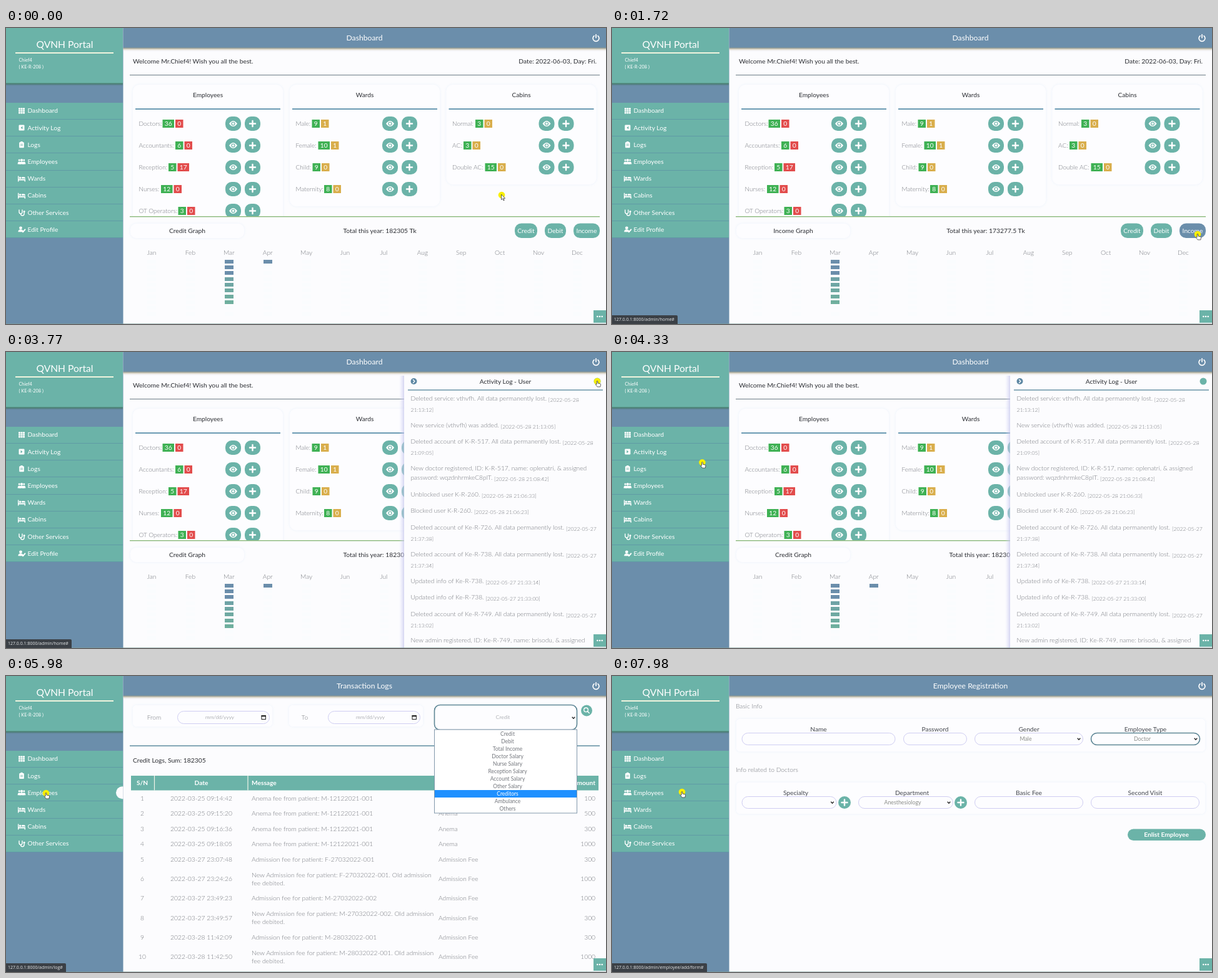
An HTML page that plays this animation: 960x475 px, repeating every 8000 ms.

```html
<!DOCTYPE html>
<html lang="en">
<head>
<meta charset="utf-8">
<title>Portal tour</title>
<style>
html, body { margin: 0; width: 100%; height: 100%; overflow: hidden; background: #fcfcfe; }
svg { display: block; width: 960px; height: 475px; }
text { font-family: Lato, "Open Sans", sans-serif; white-space: pre; }
.status { font-family: "Open Sans", "Noto Sans", sans-serif; }
.card { fill: #fdfdff; stroke: #f6f8fd; filter: drop-shadow(0 0 1.5px rgba(130, 190, 240, .1)); }
.field { fill: #fdfdff; stroke: #cfcdf2; }
.focus { fill: none; stroke: #5e8795; stroke-width: 1.6; }
.line { fill: none; stroke: #fff; stroke-width: 1.4; stroke-linecap: round; stroke-linejoin: round; }
</style>
</head>
<body>
<svg id="stage" viewBox="0 0 960 475"></svg>
<script>
const LOOP = 8000;
const TEAL = '#6bb3a8', BLUE = '#6b8eab', INK = '#2c2e33', GREY = '#74777d';
const GREEN = '#3fb154', RED = '#e24c4c', AMBER = '#d9ae4c';
const BOLD = 'font-weight="700"', LIGHT = 'font-weight="300"';

// y is the optical middle of a line of text; grey text is set light
const text = (x, y, s, size = 10, fill = INK, anchor = 'start', more = fill === GREY ? LIGHT : '') =>
  `<text x="${x}" y="${(y + size * .35).toFixed(2)}" font-size="${size}" fill="${fill}" text-anchor="${anchor}" ${more}>${s}</text>`;
const mid = (x, y, s, size, fill, more) => text(x, y, s, size, fill, 'middle', more);
const rect = (x, y, w, h, fill, r = 0, more = '') =>
  `<rect x="${x}" y="${y}" width="${w}" height="${h}" rx="${r}" fill="${fill}" ${more}/>`;
const box = (x, y, x2, y2, r, cls) =>
  `<rect class="${cls}" x="${x + .5}" y="${y + .5}" width="${x2 - x - 1}" height="${y2 - y - 1}" rx="${r}"/>`;
const dot = (x, y, r, fill) => `<circle cx="${x}" cy="${y}" r="${r}" fill="${fill}"/>`;
const path = (d, fill = '#fff', more = '') => `<path d="${d}" fill="${fill}" ${more}/>`;
const stroke = (d, more = '') => `<path class="line" d="${d}" ${more}/>`;
const at = (x, y, s) => `<g transform="translate(${x} ${y})">${s}</g>`;
const group = (id, s) => `<g id="${id}">${s}</g>`;
const range = n => [...Array(n).keys()];

// icons, centred on 0,0
const plus = stroke('M-4.5 0H4.5M0 -4.5V4.5', 'style="stroke-width:2.4"');
const eye = path('M-6.5 0Q0 -9 6.5 0Q0 9 -6.5 0Z') + dot(0, 0, 3.1, TEAL) + dot(0, 0, 1.9, '#fff');
const chevron = (x, y) => `<path d="M${x - 2.3} ${y - 1.2}l2.3 2.4l2.3 -2.4" fill="none" stroke="#222" stroke-width="1.3"/>`;
const bed = path('M-6 -4h1.4v5h10.6v4h-1.4v-2h-9.2v2h-1.4z M0 -2.6h4q2 0 2 2.6h-6z') + dot(-2.4, -1.2, 1.6, '#fff');
const person = (x, r) => dot(x, -2.4, r, '#fff') + path(`M${x - r * 1.7} 4q0 -4 ${r * 1.7} -4t${r * 1.7} 4z`);
const arrowBox = d => rect(-4.5, -4.5, 9, 9, '#fff', 1.3) + path(d, TEAL);
const icons = {
  Dashboard: range(9).map(i => rect(-5 + i % 3 * 3.5, -4.5 + (i / 3 | 0) * 3.2, 3, 2.7, '#fff', .4)).join(''),
  'Activity Log': `<g id="logClosed">${arrowBox('M1.5 -2.5v5l-3 -2.5z')}</g><g id="logOpen">${arrowBox('M-1.5 -2.5v5l3 -2.5z')}</g>`,
  Logs: rect(-3.8, -4, 7.6, 9, '#fff', 1) + rect(-1.8, -5.2, 3.6, 2.4, '#fff', 1) +
    path('M-2 -1h4v.8h-4zM-2 1h4v.8h-4z', TEAL),
  Employees: person(-3.8, 1.5) + person(3.8, 1.5) + person(0, 2.1),
  Wards: bed, Cabins: bed,
  'Other Services': stroke('M-4 -4v3q0 3 2.5 3t2.5 -3v-3M-1.5 2q0 3 2.8 3t2.8 -3v-2') + dot(4.1, -1.6, 1.5, '#fff'),
  'Edit Profile': person(-1.5, 2.4) + stroke('M2 4l3.5 -3.8', 'style="stroke-width:2"')
};

const PITCH = 27.2;
const menu = names => rect(0, 120, 187, Math.round(names.length * PITCH) - 1, TEAL) + names.map((name, i) => {
  const y = 132.8 + i * PITCH;
  return at(25, y, icons[name]) + text(34.5, y, name, 10.2, '#fff') +
    rect(0, Math.round(146 + i * PITCH), 187, 1, '#5f9aa5');
}).join('');
const allItems = Object.keys(icons);

const frame = () =>
  rect(0, 0, 187.5, 475, BLUE) + rect(187.5, 0, 772.5, 31, BLUE) + rect(187.5, 31, 772.5, 7, 'url(#edge)') +
  rect(0, 0, 187, 89, TEAL) + rect(0, 88, 187, 5, 'url(#sideEdge)') +
  mid(94, 27, 'QVNH Portal', 15.6, '#fff') + rect(15, 39, 157, 2, '#f1f5df') +
  text(20.5, 51, 'Chief4', 7.3, '#fff') + text(20.5, 62, '( KE-R-208 )', 7.3, '#fff') +
  stroke('M941 12.6a4.9 4.9 0 1 0 6 0M944 10.5v5', 'style="stroke-width:1.7"');

// dashboard
const card = (x, bottom, title, rows, second) =>
  box(x, 90, x + 242, bottom, 11, 'card') + mid(x + 121, 107.5, title, 10.2) +
  rect(x + 5, 129, 232, 2, '#6a9ab3') + rows.map(([label, a, ax, b, bx], i) => {
    const y = 153 + i * 35;
    const badge = (left, n, fill) => {
      const w = String(n).length * 6 + 6.5;
      return rect(left, y - 6, w, 13, fill) + mid(left + w / 2, y + .3, n, 10.2, '#fff');
    };
    const button = (dx, icon) => rect(x + dx, y - 11, 25, 23, TEAL, 10) + at(x + dx + 12.5, y + .5, icon);
    return text(x + 10.5, y, label + ':', 10, GREY) + badge(ax, a, GREEN) + badge(bx, b, second) +
      button(149, eye) + button(180, plus);
  }).join('');

const monthX = i => 233 + i * 61.9;
const cell = (month, i, fill) => rect(Math.round(monthX(month) - 6.8), Math.round(371.5 + i * 9.35), 14, 6, fill);
const bar = (month, i) => cell(month, i, i < 3 ? BLUE : `rgb(111 ${154 + i * 3} ${172 - i * 2})`);
const buttons = [['Credit', 814, 850], ['Debit', 862, 896], ['Income', 908, 950]];

const dashboard = () =>
  text(203, 53, 'Welcome Mr.Chief4! Wish you all the best.', 10.3) +
  text(945, 53, 'Date: 2022-06-03, Day: Fri.', 10.3, INK, 'end') +
  rect(198, 75, 752, 1, '#6b7b84') +
  `<g clip-path="url(#cards)">` +
  card(202, 330, 'Employees', [['Doctors', 36, 250.5, 0, 271], ['Accountants', 6, 271, 0, 285.5],
    ['Reception', 5, 260, 17, 274.5], ['Nurses', 12, 248, 0, 268.5], ['OT Operators', 3, 275.5, 0, 290]], RED) +
  card(453, 287, 'Wards', [['Male', 9, 489.5, 1, 504], ['Female', 10, 499.5, 1, 520],
    ['Child', 9, 490.5, 0, 505], ['Maternity', 8, 509, 0, 523.5]], AMBER) +
  card(703.5, 252, 'Cabins', [['Normal', 3, 751, 0, 765.5], ['AC', 3, 732, 0, 746.5], ['Double AC', 15, 766.5, 0, 787]], AMBER) +
  '</g>' + rect(198, 302, 752, 1.4, '#8ab97a') +
  box(198, 313, 382, 338, 10, 'card') +
  mid(290, 325, '', 10.3, INK, 'id="graphName"') + mid(598, 325, '', 10.3, INK, 'id="total"') +
  buttons.map(([name, x, x2]) => rect(x, 313.5, x2 - x, 23.5, TEAL, 10.5, `id="btn${name}"`) +
    mid((x + x2) / 2, 325, name, 10.2, '#fff')).join('') +
  range(12).map(m => range(10).map(i => cell(m, i, '#fafcfe')).join('') +
    mid(monthX(m), 360.5, 'Jan Feb Mar Apr May Jun Jul Aug Sep Oct Nov Dec'.split(' ')[m], 10.2, GREY)).join('') +
  range(8).map(i => bar(2, i)).join('') + group('aprilBar', bar(3, 0));

// activity panel: y, text, stamp, optional wrapped end of the stamp
const entries = [
  [74, 'Deleted service: vthvfh. All data permanently lost.', '[2022-05-28', '21:13:12]'],
  [117, 'New service (vthvfh) was added.', '[2022-05-28 21:13:05]'],
  [143, 'Deleted account of K-R-517. All data permanently lost.', '[2022-05-28', '21:09:05]'],
  [186, 'New doctor registered, ID: K-R-517, name: oplenatri, &amp; assigned', ''],
  [201, 'password: wqzdnhrmkeC8plT.', '[2022-05-28 21:08:42]'],
  [228, 'Unblocked user K-R-260.', '[2022-05-28 21:06:33]'],
  [254, 'Blocked user K-R-260.', '[2022-05-28 21:06:23]'],
  [281, 'Deleted account of Ke-R-726. All data permanently lost.', '[2022-05-27', '21:37:38]'],
  [324, 'Deleted account of Ke-R-738. All data permanently lost.', '[2022-05-27', '21:37:34]'],
  [367, 'Updated info of Ke-R-738.', '[2022-05-27 21:33:14]'],
  [393, 'Updated info of Ke-R-738.', '[2022-05-27 21:33:00]'],
  [420, 'Deleted account of Ke-R-749. All data permanently lost.', '[2022-05-27', '21:13:02]'],
  [462, 'New admin registered, ID: Ke-R-749, name: brisodu, &amp; assigned', '']
];
const panel = () =>
  rect(629, 38, 8, 437, 'url(#panelEdge)') + rect(637, 32, 323, 443, '#fcfcfe') +
  dot(652.5, 47, 5, '#5d87a3') + stroke('M651.5 44.5l2.4 2.5l-2.4 2.5') +
  mid(799, 47, 'Activity Log - User', 10.2) + dot(946, 47, 5.5, TEAL) + rect(643, 60.3, 312, 1.4, '#5d8ca0') +
  entries.map(([y, s, stamp, rest]) =>
    text(647.5, y, `${s} <tspan font-size="8.6" dy="2.5">${stamp}</tspan>`, 10.2, GREY) +
    (rest ? text(647.5, y + 19, rest, 8.6, GREY) : '')).join('');

// transaction logs
const anema = 'Anema fee from patient: M-12122021-001';
const debited = id => [`New Admission fee for patient: ${id}. Old admission`, 'fee debited.'];
const first = id => [`Admission fee for patient: ${id}`];
const rows = [
  [196, '25 09:14:42', [anema], 100], [220.5, '25 09:15:20', [anema], 500],
  [245, '25 09:16:36', [anema], 300], [269.5, '25 09:18:05', [anema], 1000],
  [294, '27 23:07:48', first('F-27032022-001'), 300], [325.5, '27 23:24:26', debited('F-27032022-001'), 1000],
  [356.5, '27 23:49:23', first('M-27032022-002'), 1000], [388, '27 23:49:57', debited('M-27032022-002'), 300],
  [419, '28 11:42:09', first('M-28032022-001'), 300], [450.5, '28 11:42:50', debited('M-28032022-001'), 1000]
];
const dateField = (label, labelX, x, x2) =>
  mid(labelX, 66, label, 10.2, GREY) + box(x, 56, x2, 77, 10, 'field') + mid((x + x2) / 2 - 6, 66.5, 'mm/dd/yyyy', 8.3, GREY) +
  `<rect x="${x2 - 13}" y="63.5" width="6.4" height="6" fill="none" stroke="#222"/>` + rect(x2 - 13.4, 63, 7.2, 2.2, '#222');
const options = (id, x, x2, y, names, cx) => group(id, rect(x + .5, y, x2 - x - 1, names.length * 12 + 2, '#fff', 0, 'stroke="#8298ab"') +
  rect(x + 1, y + 1, x2 - x - 2, 12, '#1e90ff', 0, `id="${id}Mark"`) +
  names.map((n, i) => mid(cx, y + 7 + i * 12, n, 8.5, GREY, 'class="option"')).join(''));

const logs = () =>
  box(202, 46, 427, 82, 6, 'card') + box(452, 46, 668, 82, 6, 'card') +
  dateField('From', 237, 274, 422) + dateField('To', 478, 515, 663) +
  box(685, 46, 914, 87, 9, 'field') + mid(795, 66, 'Credit', 8.5, GREY) + chevron(908, 67) +
  dot(929, 55.5, 9, TEAL) + `<circle class="line" cx="928" cy="54.3" r="3.3"/>` + stroke('M930.6 57l2.6 2.6') +
  rect(198, 111.3, 752, 1.5, '#5d8ca0') + text(203, 135, 'Credit Logs, Sum: 182305', 10.3) +
  rect(200, 160, 748, 23.5, TEAL) + [237.5, 387, 686, 835.5].map(x => rect(x - .6, 160, 1.2, 23.5, '#f1f5ea')).join('') +
  mid(218, 171.5, 'S/N', 10.2, '#fff', BOLD) + mid(312.5, 171.5, 'Date', 10.2, '#fff', BOLD) +
  text(393, 171.5, 'Message', 10.2, '#fff', 'start', BOLD) + text(692, 171.5, 'Type', 10.2, '#fff', 'start', BOLD) +
  text(943, 171.5, 'Amount', 10.2, '#fff', 'end', BOLD) +
  rows.map(([y, date, lines, amount], i) =>
    mid(218, y, i + 1, 10.2, GREY) + mid(312.5, y, '2022-03-' + date, 10.3, GREY) +
    lines.map((s, k) => text(393, y + (lines.length > 1 ? k * 13 - 6.5 : 0), s, 10.35, GREY)).join('') +
    text(692, y, i < 4 ? 'Anema' : 'Admission Fee', 10.2, GREY) + text(943, y, amount, 10.2, GREY, 'end')).join('') +
  group('creditFocus', box(685, 46, 914, 87, 9, 'focus')) +
  options('creditList', 685, 914, 86, ['Credit', 'Debit', 'Total Income', 'Doctor Salary', 'Nurse Salary', 'Reception Salary',
    'Account Salary', 'Other Salary', 'Creditors', 'Ambulance', 'Others'], 802.5);

// employee form
const field = (label, x, x2, y, value) =>
  mid((x + x2) / 2, y - 16, label, 10.2, '#45484f') + box(x, y - 10, x2, y + 10, 9.5, 'field') +
  (value === undefined ? '' : mid((x + x2) / 2 - 5, y, value, 8.8, '#8b8d88') + chevron(x2 - 7, y));
const addButton = x => dot(x, 203, 10, TEAL) + at(x, 203, plus);
const form = () =>
  text(198, 48.5, 'Basic Info', 10.2, GREY) + box(198, 68, 950, 122, 6, 'card') +
  field('Name', 207.5, 453.5, 101) + field('Password', 466, 568, 101) +
  field('Gender', 580, 754, 101, 'Male') + field('Employee Type', 766, 941, 101, 'Doctor') +
  text(198, 150.5, 'Info related to Doctors', 10.2, GREY) + box(198, 170, 950, 222, 6, 'card') +
  mid(294, 187, 'Specialty', 10.2, '#45484f') + field('', 207.5, 359.5, 203, '') +
  mid(480, 187, 'Department', 10.2, '#45484f') + field('', 394, 546, 203, 'Anesthesiology') +
  field('Basic Fee', 580, 754, 203) + field('Second Visit', 766, 940, 203) +
  addButton(372) + addButton(558) + rect(825, 245.5, 125, 18.5, TEAL, 9.2) + mid(887, 254.8, 'Enlist Employee', 10.2, '#fff', BOLD) +
  group('typeFocus', box(766, 91, 941, 111, 9.5, 'focus')) +
  options('typeList', 766, 941, 111, ['Doctor', 'Nurse', 'Receptionist', 'Accountant', 'OT Operator', 'Other'], 853);

const pointer = () => dot(0, 0, 5.3, '#f8ef00') +
  group('arrow', path('M-.5 -1v8.6l2 -1.8l1.5 3.2l1.3 -.6l-1.4 -3.1h2.7z', '#fff', 'stroke="#222" stroke-width=".7"')) +
  group('hand', path('M-.9 0q.9 -1.2 1.8 0v3l3.8 .9q1 .3 .8 1.6l-.7 3.4h-4.6l-2.9 -3.6q.4 -1.3 1.8 -.2z', '#fff', 'stroke="#222" stroke-width=".7"'));

const fade = (id, dir, ...stops) => `<linearGradient id="${id}" ${dir}>` +
  stops.map(([o, c, a]) => `<stop offset="${o}" stop-color="${c}" stop-opacity="${a}"/>`).join('') + '</linearGradient>';
const stage = document.getElementById('stage');
stage.innerHTML = '<defs>' +
  fade('edge', 'x2="0" y2="1"', [0, '#5f7f92', .95], [.3, '#a9a590', .8], [.55, '#ddd6c4', .6], [1, '#e9e9ff', 0]) +
  fade('sideEdge', 'x2="0" y2="1"', [0, '#4f8f78', .7], [.4, '#47796f', .9], [1, '#5f8290', 0]) +
  fade('panelEdge', 'x2="1" y2="0"', [0, '#dcdcff', 0], [1, '#c3c4ea', .7]) +
  '<clipPath id="cards"><path d="M190 80H960V302H190z"/></clipPath><clipPath id="side"><path d="M0 0H187.5V475H0z"/></clipPath></defs>' +
  rect(0, 0, 960, 475, '#fcfcfe') + group('dashboard', dashboard()) + group('logs', logs()) + group('form', form()) +
  `<g id="panel">${panel()}</g>` + frame() +
  group('fullMenu', menu(allItems)) + group('shortMenu', menu(allItems.filter(n => !/Act|Edit/.test(n)))) +
  `<g clip-path="url(#side)"><circle id="bump" r="10" fill="#fcfcfe"/></g>` + mid(573.5, 15.5, '', 12.2, '#fff', 'id="title"') +
  rect(940, 453, 20, 20, TEAL) + [946.3, 950, 953.7].map(x => dot(x, 463, 1.3, '#fff')).join('') +
  rect(0, 474, 960, 1, '#7f9f9c', 0, 'opacity=".6"') +
  group('status', rect(-2, 461, 10, 16, '#3b4046', 2, 'id="statusBox"') + text(3, 468, '', 7, '#e4e6e8', 'start', 'class="status" id="statusText"')) +
  group('pointer', pointer());

const $ = id => document.getElementById(id);
const show = (id, on) => $(id).style.display = on ? '' : 'none';
const label = (id, s) => { if ($(id).textContent !== s) $(id).textContent = s; };
const clamp = v => Math.max(0, Math.min(1, v));
const ease = v => v * v * (3 - 2 * v);
const within = (t, a, b) => t >= a && t < b;

// time, x, y of the pointer tip
const route = [
  [0, 793, 268], [130, 793, 268], [480, 832, 325], [560, 832, 325], [720, 880, 325], [980, 880, 326], [1280, 934, 328],
  [1420, 937, 331], [1790, 937, 331], [2210, 60, 134], [2700, 60, 134], [3080, 78, 151], [3170, 80, 157],
  [3330, 80, 157], [3720, 946, 47], [4010, 946, 47], [4400, 72, 189], [5040, 72, 189], [5400, 797, 67],
  [5470, 797, 67], [5650, 800, 188], [5700, 800, 188], [5960, 64, 188], [6660, 64, 188], [7050, 853, 102],
  [7130, 853, 102], [7280, 853, 148], [7420, 853, 118], [7500, 853, 118], [7900, 112, 186], [LOOP, 112, 186]
];
function tipAt(t) {
  const i = route.findIndex(k => k[0] > t), [t0, x0, y0] = route[i - 1], [t1, x1, y1] = route[i];
  const p = ease((t - t0) / (t1 - t0));
  return [x0 + (x1 - x0) * p, y0 + (y1 - y0) * p];
}

const RELOAD = 2400, PANEL = 3250, TO_LOGS = 4450, TO_FORM = 6350;
const bumps = [[2140, 2390, 0], [2500, 3010, 0], [3030, 3420, 1], [4340, 4450, 2], [5900, TO_FORM, 2]];
const statuses = [
  [1000, 1860, 'home#', 105], [3300, 4080, 'home#', 105], [4380, 5080, 'log', 92],
  [5900, TO_FORM, 'log#', 96], [TO_FORM, 6720, 'employee/add/form#', 152], [7850, LOOP, 'employee/add/form#', 152]
];

function markOption(list, top, y) {
  const texts = $(list).querySelectorAll('.option');
  const pick = Math.max(0, Math.min(texts.length - 1, Math.floor((y - top - 1) / 12)));
  $(list + 'Mark').setAttribute('y', top + 1 + pick * 12);
  texts.forEach((e, i) => e.setAttribute('fill', i === pick ? '#fff' : GREY));
}

function draw(t) {
  const page = t < TO_LOGS ? 'dashboard' : t < TO_FORM ? 'logs' : 'form';
  const home = page === 'dashboard';
  for (const p of ['dashboard', 'logs', 'form']) show(p, p === page);
  show('fullMenu', home);
  show('shortMenu', !home);
  label('title', { dashboard: 'Dashboard', logs: 'Transaction Logs', form: 'Employee Registration' }[page]);

  const graph = within(t, 760, 1350) ? 'Debit' : within(t, 1350, RELOAD) ? 'Income' : 'Credit';
  label('graphName', graph + ' Graph');
  label('total', `Total this year: ${{ Credit: '182305', Debit: '9027.5', Income: '173277.5' }[graph]} Tk`);
  show('aprilBar', graph === 'Credit');

  const [x, y] = tipAt(t);
  let linked = (x < 187 && y > 120 && y < 336) || (home && x > 938 && y < 60);
  for (const [name, x0, x1] of buttons) {
    const over = home && x >= x0 && x <= x1 && y > 313 && y < 338;
    $('btn' + name).setAttribute('fill', over ? BLUE : TEAL);
    linked = linked || over;
  }
  $('pointer').setAttribute('transform', `translate(${x} ${y})`);
  show('hand', linked);
  show('arrow', !linked);

  const open = home && t >= PANEL;
  show('panel', open);
  show('logOpen', open);
  show('logClosed', !open);
  $('panel').setAttribute('transform', `translate(${330 * (1 - ease(clamp((t - PANEL) / 380)))} 0)`);

  show('creditFocus', within(t, 5440, TO_FORM));
  show('creditList', within(t, 5450, 6080));
  markOption('creditList', 86, tipAt(Math.min(t, 5690))[1]);
  show('typeFocus', t >= 7090);
  show('typeList', within(t, 7110, 7500));
  markOption('typeList', 111, y);

  const bump = bumps.find(b => within(t, b[0], b[1]));
  show('bump', bump);
  if (bump) {
    $('bump').setAttribute('cx', 198 - 12 * clamp((t - bump[0]) / 60));
    $('bump').setAttribute('cy', 132.8 + bump[2] * PITCH);
  }

  const status = statuses.find(s => within(t, s[0], s[1]));
  show('status', status);
  if (status) {
    label('statusText', '127.0.0.1:8000/admin/' + status[2]);
    $('statusBox').setAttribute('width', status[3] + 2);
    $('status').style.opacity = within(t, 5030, 5080) ? .4 : 1;
  }
}

const start = performance.now();
function tick() {
  draw((performance.now() - start) % LOOP);
  requestAnimationFrame(tick);
}
tick();
</script>
</body>
</html>
```
